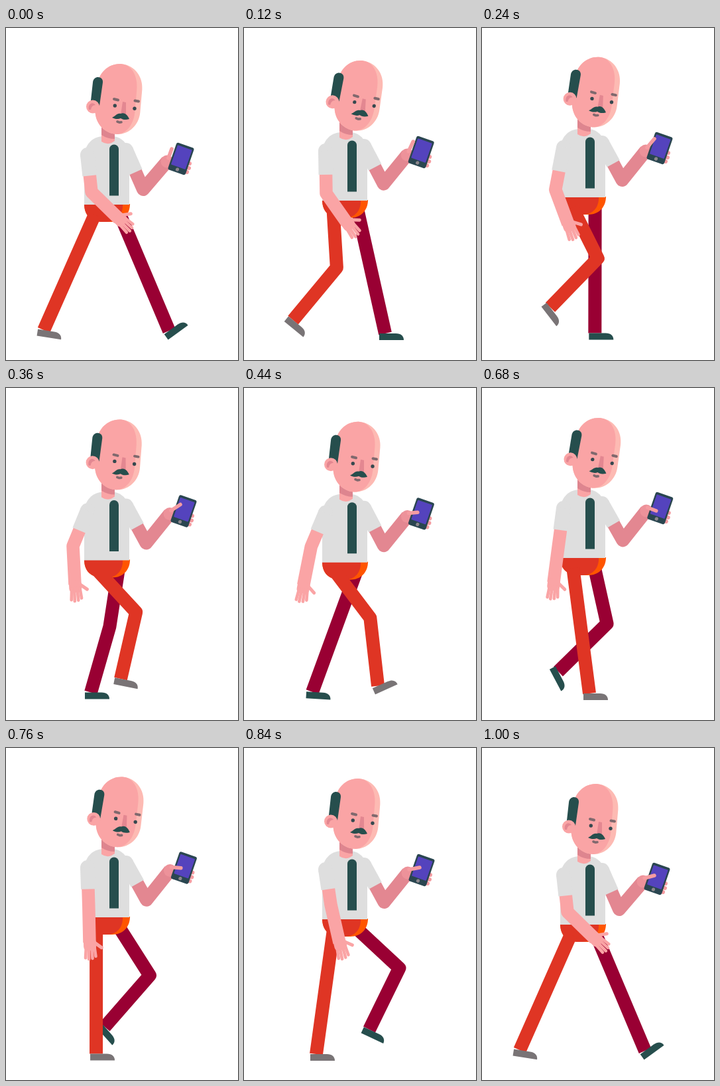
These frames come from a looping animation (350x500 px, 1.04 s). An HTML page with a canvas:

```html
<!DOCTYPE html>
<html lang="en">
<head>
<meta charset="utf-8">
<title>Walking with a phone</title>
<style>
html, body { margin: 0; width: 100%; height: 100%; overflow: hidden; background: #fff; }
canvas { display: block; }
</style>
</head>
<body>
<canvas id="stage" width="350" height="500"></canvas>
<script>
const c = document.getElementById('stage').getContext('2d');
const STEP = 40, LOOP = 1040, CYCLE = 25;
const SKIN = '#faa4a5', SHADE = '#e38791', SHIRT = '#dedede', TEAL = '#264e4d',
      RED = '#df3524', WINE = '#990033', ORANGE = '#ff5500', GREY = '#797476', BROW = '#80696e';
const THIGH = 86, SHIN = 103;

// Each key row: step, then values. Ankle keys: x, y, foot angle in degrees.
const nearAnkle = track([
  [0, 57, 455, 9], [3, 74, 440, 39], [4.5, 80, 428, 60], [6.5, 113, 420, 48], [9, 173, 438, 11],
  [12.3, 210, 454, -36], [13, 207, 456, -31], [15, 184, 460, 0], [17, 162, 460, 0],
  [21, 109, 461, 0], [25, 57, 455, 9]]);
const farAnkle = track([
  [0, 246, 456, -36], [3, 213, 460, 0], [9, 128, 458.5, 0], [12, 96, 457, 7], [13, 94, 452, 16],
  [15.5, 103, 440, 40], [17, 115, 427, 62], [19, 149, 420, 48], [21, 189, 424, 25], [25, 246, 456, -36]]);
// Elbow x, y, wrist x, y
const nearArm = track([
  [0, 129, 247, 170, 287], [3, 124, 249, 155, 293], [9, 101, 238, 104, 296], [13, 102, 240, 82, 298],
  [17, 115, 240, 108, 293], [21, 131, 236, 144, 293], [25, 129, 247, 170, 287]]);
// Bob, head tilt, phone lift
const body = track([
  [0, 0, 0, 0], [3, -6, 3, .8], [6, -11, 2, 1], [9, -6.5, -.5, 1], [13, -1.5, 1, .7],
  [17, -10, 3, 1.2], [19, -11, 1.6, 1.1], [21, -8, 0, 1], [25, 0, 0, 0]]);
// Thumb tip relative to the phone
const thumb = track([
  [0, -14, -15], [3, -12, -16], [9, -5, -10], [13, -6, 4], [17, -6, 4], [21, -3, -4], [25, -4, -5]]);

// Monotone cubic interpolation that wraps around the walk cycle
function track(keys) {
  const n = keys.length - 1;
  const slope = (i, j) => {
    const k = (i + n) % n;
    return (keys[k + 1][j] - keys[k][j]) / (keys[k + 1][0] - keys[k][0]);
  };
  const tangent = (i, j) => {
    const a = slope(i - 1, j), b = slope(i, j);
    return a * b > 0 ? 2 * a * b / (a + b) : 0;
  };
  return f => {
    let i = 0;
    while (i < n - 1 && f >= keys[i + 1][0]) i++;
    const p = keys[i], q = keys[i + 1], w = q[0] - p[0], u = (f - p[0]) / w, v = 1 - u;
    return p.slice(1).map((y, k) => {
      const j = k + 1;
      return y * v * v * (1 + 2 * u) + q[j] * u * u * (3 - 2 * u)
        + w * u * v * (v * tangent(i, j) - u * tangent(i + 1, j));
    });
  };
}

function line(color, width, points, cap = 'round') {
  c.strokeStyle = color;
  c.lineWidth = width;
  c.lineCap = cap;
  c.lineJoin = 'round';
  c.beginPath();
  points.forEach(p => c.lineTo(...p));
  c.stroke();
}

function fill(color, d) {
  c.fillStyle = color;
  c.fill(new Path2D(d));
}

function dot(color, x, y, r) {
  c.fillStyle = color;
  c.beginPath();
  c.arc(x, y, r, 0, 7);
  c.fill();
}

function box(color, x, y, w, h, r) {
  c.fillStyle = color;
  c.beginPath();
  c.roundRect(x, y, w, h, r);
  c.fill();
}

function at(x, y, angle, draw) {
  c.save();
  c.translate(x, y);
  c.rotate(angle);
  draw();
  c.restore();
}

const rad = deg => deg * Math.PI / 180;
const mix = (p, q, u) => [p[0] + (q[0] - p[0]) * u, p[1] + (q[1] - p[1]) * u];

function leg(color, shoe, hip, [x, y, turn]) {
  const dx = x - hip[0], dy = y - hip[1], dist = Math.hypot(dx, dy);
  const along = Math.min(THIGH, (THIGH ** 2 + dist ** 2 - SHIN ** 2) / (2 * dist));
  const out = Math.sqrt(THIGH ** 2 - along ** 2);
  const knee = [hip[0] + (dx * along + dy * out) / dist, hip[1] + (dy * along - dx * out) / dist];
  line(color, 20, [hip, knee, [x, y]], 'butt');
  at(x, y, rad(turn), () => fill(shoe, 'M-9 0H16C24 0 28 4 28 10H-9Z'));
}

function sleeve(shoulder, elbow) {
  dot(SHIRT, ...shoulder, 11);
  line(SHIRT, 22, [shoulder, mix(shoulder, elbow, .56)], 'butt');
}

function hand(wrist, angle) {
  at(...wrist, angle, () => {
    box(SKIN, -6, -10, 18, 19, 6);
    [[21, -9], [24, -4], [25, 1.5], [23, 6.5]].forEach(([x, y]) => line(SKIN, 4.6, [[6, y * .8], [x, y]]));
    line(SKIN, 5, [[-1, -6], [8, -18]]);
  });
}

function phoneArm(bob, lift, tip) {
  const shoulder = [181, 184 + bob], elbow = [207 + 4.5 * lift, 243 + bob - 3 * lift];
  const x = 264 + 4 * lift, y = 197 + bob - 5 * lift, palm = [x - 21, y + 4];
  line(SHADE, 20, [shoulder, elbow, palm], 'butt');
  sleeve(shoulder, elbow);
  dot('#ed929a', ...palm, 9.5);
  [[13, 7], [12, 14], [9, 20]].forEach(([dx, dy]) => line('#f59ca1', 6, [[x, y + dy - 4], [x + dx, y + dy]]));
  at(x, y, rad(19), () => {
    box('#2a4650', -14, -21.5, 28, 43, 3);
    box('#5443bd', -11.5, -18, 23, 31, 1);
    dot('#8c878c', 0, 17, 2.6);
  });
  line('#f59ca1', 5.5, [[palm[0] + 2, palm[1] - 5], [x + tip[0], y + tip[1]]]);
}

function head() {
  at(170, 107, rad(5), () => {
    c.fillStyle = '#fdbab3';
    c.fill(new Path2D('M0-53C19-53 34-37 34-17V17C34 37 19 53 0 53C-19 53-34 37-34 17V-17C-34-37-19-53 0-53'));
    fill(SKIN, 'M0-53C-19-53-34-37-34-17V17C-34 37-19 53 0 53C15 53 26 37 26 17V-17C26-37 15-53 0-53');
  });
  fill(TEAL, 'M131 82C132 71 147 72 146 82L141 117 128 109Z');
  dot(SKIN, 131, 118.5, 10);
  fill(SHADE, 'M125 123C123 114 131 110 135 116Q129 116 128 123Z');
  fill(SHADE, 'M176 111L181 112 181 131H173Z');
  line(BROW, 4, [[163, 107], [169, 108.5]]);
  line(BROW, 4, [[194.5, 109.5], [200, 110.5]]);
  dot('#36494f', 164.3, 117, 2.7);
  dot('#36494f', 194, 121.3, 2.7);
  fill(TEAL, 'M160 135C165 133 167 128 173 129C179 126 184 132 186 137C180 139 176 138 173 136C169 138 164 137 160 135');
  line(BROW, 3.6, [[168, 141], [171, 142.2], [174, 141.8]]);
}

function torso(bob, tilt) {
  c.save();
  c.translate(0, bob);
  fill(ORANGE, 'M118 265H187C187 281 176 292 160 292H146C129 292 118 283 118 265');
  fill(RED, 'M118 265H176C177 280 168 292 152 292H146C129 292 118 283 118 265');
  fill(SHIRT, 'M118 266V194C118 177 130 163 147 163H161C176 164 186 177 186 192V266Z');
  fill(SKIN, 'M144 145H164V170Q154 178 144 171Z');
  fill('#de858f', 'M144 145H164V167Q153 167 144 161Z');
  box(TEAL, 156, 175.5, 14, 77, [7, 7, 0, 0]);
  at(154, 165, rad(tilt), () => {
    c.translate(-154, -165);
    head();
  });
  c.restore();
}

function draw(f) {
  const [bob, tilt, lift] = body(f), sway = Math.cos(2 * Math.PI * f / CYCLE);
  const [ex, ey, wx, wy] = nearArm(f);
  const shoulder = [123, 191 + bob], elbow = [ex, ey], wrist = [wx, wy];
  c.fillStyle = '#fff';
  c.fillRect(0, 0, 350, 500);
  leg(WINE, TEAL, [170.5 + 1.5 * sway, 281 + bob], farAnkle(f));
  phoneArm(bob, lift, thumb(f));
  torso(bob, tilt);
  leg(RED, GREY, [136.3 - 2.3 * sway, 281 + bob], nearAnkle(f));
  line(SKIN, 19.5, [shoulder, elbow, wrist], 'butt');
  hand(wrist, Math.atan2(wy - ey, wx - ex));
  sleeve(shoulder, elbow);
}

const start = performance.now();
function tick() {
  draw(Math.floor((performance.now() - start) % LOOP / STEP));
  requestAnimationFrame(tick);
}
tick();
</script>
</body>
</html>
```
